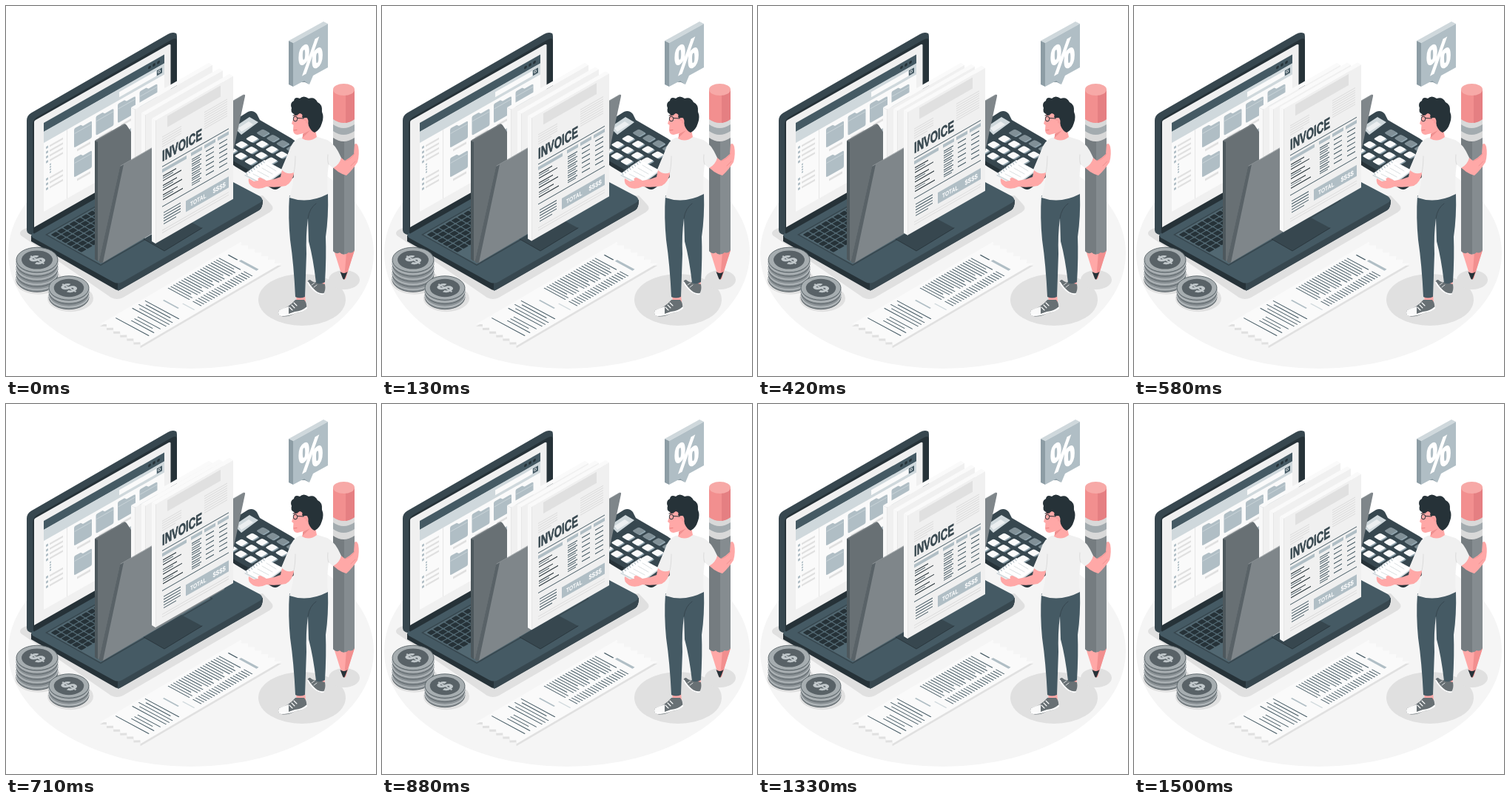
Write an HTML page that moves like this. It is 500 px wide and 500 px high and loops after 1.54 s.

```html
<!DOCTYPE html>
<html lang="en">
<head>
<meta charset="utf-8">
<title>Invoice</title>
<style>
html,body{margin:0;width:100%;height:100%;overflow:hidden;background:#fff}
svg{display:block;width:100vw;height:100vh}
text{font-family:"Liberation Sans",Arial,sans-serif;font-weight:700}
</style>
</head>
<body>
<svg id="stage" viewBox="0 0 500 500"></svg>
<script>
const NIGHT = '#263238', DARK = '#37474f', SLATE = '#455a64', MIST = '#b0bec5';
const SKIN = '#ffa8a7', PALE = '#f0f0f0', SHADE = '#e0e0e0';

const path = (d, fill, extra = '') => `<path d="${d}" fill="${fill}" ${extra}/>`;
const poly = (pts, fill, extra = '') => `<polygon points="${pts}" fill="${fill}" ${extra}/>`;
const rect = (x, y, w, h, fill, extra = '') =>
  `<rect x="${x}" y="${y}" width="${w}" height="${h}" fill="${fill}" ${extra}/>`;
const oval = (x, y, rx, ry, fill, extra = '') =>
  `<ellipse cx="${x}" cy="${y}" rx="${rx}" ry="${ry}" fill="${fill}" ${extra}/>`;
const stroke = (d, color, w = 1) =>
  `<path d="${d}" fill="none" stroke="${color}" stroke-width="${w}" stroke-linecap="round" stroke-linejoin="round"/>`;
const line = (x1, y1, x2, y2, color, w = 1) => stroke(`M${x1} ${y1}L${x2} ${y2}`, color, w);
const plane = (m, inner) => `<g transform="matrix(${m})">${inner}</g>`;
const label = (m, s, size, fill, anchor = 'start', bold = 0) =>
  `<text transform="matrix(${m})" font-size="${size}" fill="${fill}" stroke="${fill}" stroke-width="${bold}" text-anchor="${anchor}">${s}</text>`;
const each = (n, fn) => Array.from({length: n}, (_, i) => fn(i)).join('');

function ground() {
  return oval(250, 334, 247, 156, '#f5f5f5') +
    path('M20 310Q16 304 28 300L347 256L358 268Q364 274 356 279L158 394Q150 398 142 394Z', SHADE) +
    oval(400, 397, 59, 35, SHADE) + oval(457, 370, 21, 13, SHADE);
}

function folderIcon(x, y) {
  return path(`M${x} ${y + 2}q0-2 2-2h7l3 3h10q2 0 2 2v19q0 2-2 2h-20q-2 0-2-2z`, MIST) +
    line(x + 1, y + 7, x + 23, y + 7, '#cfd8dc', .7) +
    rect(x + 4, y + 30, 18, 3, SHADE);
}

function browser() {
  let s = rect(0, 0, 163, 120, '#fafafa') + rect(0, 0, 163, 12, SLATE) + rect(0, 12, 163, 15, '#cfd8dc');
  s += each(3, i => `<circle cx="${143 + i * 6}" cy="6" r="1.9" fill="${NIGHT}"/>`);
  s += rect(102, 16, 50, 7, '#fafafa') + rect(153, 16, 7, 7, SLATE) +
    '<circle cx="156" cy="19" r="1.6" fill="none" stroke="#fff" stroke-width=".7"/>';
  s += rect(31, 27, .8, 93, SHADE);
  s += each(4, i => rect(3, 34 + i * 6.5, 3, 3, MIST) + rect(8, 34.5 + i * 6.5, 18, 2.5, SHADE));
  s += each(4, i => rect(8, 60 + i * 3.5, 2, 2, MIST));
  s += each(3, i => rect(3, 77 + i * 6.5, 3, 3, MIST) + rect(8, 77.5 + i * 6.5, 18, 2.5, SHADE));
  s += each(4, i => folderIcon(41 + i * 29.5, 31)) + each(4, i => folderIcon(41 + i * 29.5, 71));
  return plane('1 -.567 0 1 51 158', s);
}

function laptop() {
  let s = path('M28 155Q28 148 34 144.500L219 38Q225 34.500 230 37Q231 38 231 43V202L40 310Q28 309 28 303Z', DARK);
  s += path('M36 160Q36 154 42 150L223 46Q231 41 231 48V202L37 310Z', NIGHT);
  s += path('M38 157Q38 155 40 154L220 52Q222.500 51 222.500 53V194L38 299Z', PALE) + browser();
  s += path('M34 310V318L146 382Q151 386 157 382L342 276Q347 273 347 262Z', NIGHT);
  s += path('M151 373V385Q154 384 157 382L342 276Q347 273 347 262Z', DARK);
  s += path('M38 306Q32 309 36 313L145 373Q151 376 157 373L343 266Q350 262 343 257L231 198Z', SLATE);
  s += line(38, 306.5, 222, 202, NIGHT, 2);
  s += poly('53,309 128,351 280,263 205,222', DARK) + poly('56,309 128,349 277,263 205,224', '#526872');
  const keys = each(6, r => each(15, c => rect(2 + c * 9.5, 2 + r * 8.2, 8, 6.8, NIGHT, 'rx="1.2"')));
  s += plane('.866 -.5 .866 .5 57 309', keys);
  s += poly('186,315 214,331 265,300 237,285', DARK) + stroke('M186 315L214 331L265 300', NIGHT, .8);
  return s;
}

function calculator() {
  let s = path('M300 170V205Q302 212 310 217L358 246Q364 250 369 246L391 230Q394 226 391 190Z', NIGHT);
  s += path('M300 160L327 143Q334 140 339 146L343 154L386 179Q395 184 391 192L369 238Q364 242 357 238L308 210L298 202Z', DARK);
  s += poly('308,164 329,150 341,157 318,174', '#cfd8dc') + poly('314,165 328,156 334,160 318,170', '#eceff1');
  const key = (x, y, c) => plane(`.866 -.5 .866 .5 ${x} ${y}`,
    rect(-5.2, -3.2, 10.4, 10, '#90a4ae', 'rx="2"') + rect(-5.2, -5.2, 10.4, 10, c, 'rx="2"'));
  s += each(4, r => each(4, c => key(347 + c * 13.3 - r * 14.3, 171.5 + c * 7.2 + r * 8, r ? '#fafafa' : '#819097')));
  return s;
}

function sheet(x, y, extra = '') {
  return poly(`${x},${y} ${x + 105},${y - 60.2} ${x + 110},${y - 57.2} ${x + 5},${y + 3}`, '#fafafa') +
    poly(`${x},${y} ${x + 5},${y + 3} ${x + 5},${y + 169} ${x},${y + 166}`, '#f8f8f8') +
    plane(`1 -.573 0 1 ${x + 5} ${y + 3}`, rect(0, 0, 105, 166, PALE) + rect(0, 0, .6, 166, SHADE) + extra);
}

function invoice() {
  let s = rect(16, 3, 72, 15, SHADE);
  s += each(5, i => rect(9, 27 + i * 3.2, i == 4 ? 18 : 26, 1, '#dadada'));
  s += each(8, i => rect(66, 26 + i * 3.2, 31, 1, '#dadada'));
  s += label('.64 0 0 1 9 60.500', 'INVOICE', 20.5, DARK, 'start', .7);
  s += rect(9, 67, 90, 1, SLATE);
  const cols = [[9, 33], [48, 15], [66, 15], [84, 15]];
  s += cols.map(([x, w]) => rect(x, 71, w, 4.5, MIST)).join('');
  s += each(6, r => {
    const y = 80 + r * 6.4;
    return rect(10, y, 18 + r * 7 % 13, 1.2, NIGHT) + (r % 2 ? '' : rect(10, y + 3, 14, .9, SLATE)) +
      rect(49, y, 13, 1.2, SLATE) + rect(49, y + 2.8, 11, 1, SLATE) +
      rect(68, y, 11, 1.2, SLATE) + rect(86, y, 11, 1.2, SLATE);
  });
  s += rect(9, 121, 90, 1, SLATE);
  s += each(5, i => rect(11, 130 + i * 3.8, i == 4 ? 17 : 23, 1.1, SLATE));
  s += rect(41, 132, 58, 15, MIST);
  s += label('.78 0 0 1 47 143', 'TOTAL', 8.5, '#fff') + label('.82 0 0 1 77.500 143', '$$$$', 9.5, '#fff');
  s += rect(9, 153, 90, .8, '#d6d6d6') + rect(9, 156.5, 90, .8, '#d6d6d6');
  return sheet(197, 152, s);
}

function folderBack() {
  return path('M120 183Q120 181 123 180L158 160Q161 158 163 161L169 170L275 112L250 265L131 347L120 342Z', '#687074') +
    path('M120 182L124 184V345L120 342Z', '#4d585d') + stroke('M121 182L160 160', '#858c90', .8);
}

function folderFront() {
  return path('M154 217L319 121Q324 118 323 122L296 248Q295 251 292 252L132 346Q126 349 126 343Z', '#7f868a') +
    path('M154 217L159 214L131 346.500Q125 349 126 343Z', '#596267') +
    stroke('M155 216L321 120', '#939a9d', .8);
}

function receipt() {
  const teeth = 6, w = 62 / teeth;
  const zig = dir => `l${-5 * dir} ${w / 2 * dir}l${5 * dir} ${w / 2 * dir}`;
  const d = 'M0 0H221' + zig(1).repeat(teeth) + 'H0' + zig(-1).repeat(teeth) + 'Z';
  let s = '';
  const row = (x, a, b, c = SLATE, h = 1.1) => rect(x, a, h, b - a, c);
  s += row(20, 4, 55) + row(28, 20, 55) + row(33, 20, 48) + row(38, 20, 55);
  s += each(5, i => row(46 + i * 5, i % 2 ? 10 : 4, i == 3 ? 48 : 56));
  s += row(80, 18, 41, MIST, 2) + row(90, 38, 56, '#cfd8dc', 1.5);
  s += each(20, i => row(101 + i * 4.2, 5, i % 4 == 2 ? 32 : 38) + row(101 + i * 4.2, 43, 56));
  s += row(192, 8, 22, SLATE, 1.5) + row(192, 25, 52, MIST, 3.5);
  const m = '.863 -.505 .881 .473 127 ';
  return plane(m + 433, path(d, SHADE)) + plane(m + 430, path(d, '#fafafa') + s);
}

function coins(x, y, n, r) {
  const ry = r * .6, step = 7;
  const arc = (cy, color, w) => stroke(`M${x - r} ${cy}a${r} ${ry} 0 0 0 ${2 * r} 0`, color, w);
  const drum = i => {
    const cy = y + i * step;
    return path(`M${x - r} ${cy}v5.500a${r} ${ry} 0 0 0 ${2 * r} 0v-5.500z`, '#8b9296') +
      arc(cy + 5.5, '#596267', 1) + arc(cy + 2.5, '#b4babd', 1.6);
  };
  let s = oval(x + 2, y + n * step, r + 4, ry + 2, SHADE);
  for (let i = n - 1; i >= 0; i--) s += drum(i);
  return s + oval(x, y, r, ry, '#a6adb0', 'stroke="#596267" stroke-width=".9"') +
    oval(x, y, r * .75, ry * .75, '#596267') +
    label(`.866 -.5 .866 .5 ${x + 7.5} ${y + 4.3}`, '$', 25, '#c3cacd', 'middle', .7);
}

function bubble() {
  return poly('382,47 429,21 435,24 388,50', '#cfd8dc') +
    poly('382,47 388,50 388,109 382,106', '#8d9da5') +
    poly('398,103 404,100 410,106 404,103', '#8d9da5') +
    poly('388,50 435,24 435,83 415,94 410,106 403,101 388,109', MIST) +
    label('.67 -.38 0 1 411.500 87', '%', 55, '#fff', 'middle', 2.4);
}

function pencil() {
  return path('M443 330L455 368Q457 371 459 368L471 330Z', SKIN) +
    path('M460 333L471 330L459 368L457 370Z', '#f28f8f') +
    path('M451.500 359Q457 363 461.500 359L458 368Q456.500 371 455 368Z', NIGHT) +
    path('M442 178V331Q446 336 451 333Q457 338 463 333Q468 335 471 330V178Z', '#858c90') +
    path('M442 178V331Q446 336 451 333Q454 336 457 335.500V183Z', '#757c80') +
    path('M442 152V178Q456 188 471 178V152Z', '#d9d9d9') +
    path('M442 160V169Q456 179 471 169V160Q456 170 442 160Z', '#a3abaf') +
    path('M442 113V153Q456 163 471 153V113Z', '#f28f8f') +
    path('M459 113H471V153Q466 157 459 158Z', '#e57f82') +
    oval(456.500, 113, 14.5, 8, '#f7a9a7');
}

function shoes() {
  const back = path('M419 373L431 376Q432.500 384 429 389Q424 391 419 387Q412 381 408 374Q407 370 411 370Q416 374 419 373Z', '#687074') +
    stroke('M408 373.500Q413 382 420 387Q425 390 429 389', '#fff', 1.8) +
    stroke('M413 377L417 374M416 380L420 377', '#fff', .8);
  const front = path('M23 0L35 0Q39 5 38 11Q34 17 23 18Q12 24 4 22Q-2 20 1 14Q14 11 23 0Z', '#687074') +
    path('M14 9Q6 12 1 14Q-2 20 4 22Q9 22 14 20Z', '#fafafa') +
    stroke('M2 20Q12 22 23 17Q33 16 38 11', '#fff', 2.2) +
    stroke('M15 10L19 14M18 7L22 11M21 4L25 8', '#fff', 1.1);
  return back + `<g transform="translate(368 397)">${front}</g>`;
}

function notepad() {
  return poly('322,229 349,210 375,224 349,243', '#cfd8dc') +
    poly('322,227 349,208 375,222 349,241', '#fff') +
    each(8, i => line(324 + i * 3.3, 225 - i * 2.3, 326 + i * 3.3, 228 - i * 2.3, '#90a4ae', .9)) +
    each(4, i => line(334 + i * 6, 227 - i * 4, 350 + i * 5, 235 - i * 4, '#d0d6d9', .8));
}

function man() {
  let s = path('M392 390H404L405 401L393 403Z', SKIN) + path('M420 368H430L431 378L420 376Z', SKIN);
  s += shoes();
  s += path('M383 256Q408 267 435 253Q436 285 432 312Q433 340 431 373Q425 377 419 374Q415 340 409 318L408 287Q405 310 406 335L404 393Q397 396 391 393Q389 350 384 316Q381 285 383 256Z', SLATE);
  s += stroke('M408 287Q410 273 419 267', DARK, 1);
  s += notepad();
  s += path('M374 217L390 223Q387 239 378 243Q364 246 352 244Q342 249 334 245Q326 240 328 233L335 237L341 236Q339 232 344 232L352 236Q362 235 371 231Z', SKIN);
  s += path('M437 213L449 202L458 209Q464 206 470 200L471 187Q474 184 476 190Q478 200 475 211Q468 222 460 229Q448 226 437 213Z', SKIN);
  s += stroke('M471 199Q468 206 459 209M466 216L472 210', '#ef8f8f', .8);
  s += path('M397 178Q387 181 382 197L372 221Q380 229 389 225Q389 240 383 259Q408 268 435 254Q433 235 436 214L442 219Q451 214 453 205Q445 186 434 181L418 176Z', PALE);
  s += stroke('M391 203Q391 216 389 225M435 201Q434 210 436 214', '#d9d9d9', .9);
  s += path('M390 141L388 153L386 159L388.500 161L388 167Q388 174 394 174L402 172L400 179Q410 185 420 177L416 158L402 141Z', SKIN);
  s += path('M401 173L411 168L401 178Z', '#ef8f8f');
  s += path('M389 146Q384 143 386 138Q383 131 389 128Q390 122 397 125Q402 120 409 125Q417 122 421 130Q428 133 427 143Q430 150 427 158Q424 168 417 171Q412 169 409 162L407 151Q403 154 400 150Q402 146 397 145Q392 149 389 146Z', NIGHT);
  s += oval(404.500, 156, 4, 5, SKIN) + stroke('M403 154Q407 153 406 158', '#ef8f8f', .8);
  s += oval(391, 152.5, 2.7, 3.4, 'none', `stroke="${NIGHT}" stroke-width="1"`);
  s += line(394, 151.5, 402, 152, NIGHT, 1) + line(388, 148, 394, 147, NIGHT, 1);
  return s + stroke('M389 168L393 167.500', '#e57373', .8);
}

const stage = document.getElementById('stage');
stage.innerHTML = ground() + calculator() + laptop() + folderBack() + sheet(169, 137) +
  `<g id="middle">${sheet(183, 144.5)}</g>` + folderFront() + `<g id="front">${invoice()}</g>` +
  receipt() + coins(42, 343, 4, 28) + coins(85, 381, 2, 27) + bubble() + pencil() + man();
const middle = document.getElementById('middle');
const front = document.getElementById('front');

const LOOP = 1540, PEAK = 735, LAND = 1480, LIFT = 19.6;

function draw(ms) {
  const t = ms % LOOP;
  const k = t < PEAK ? t / PEAK : Math.max(0, (LAND - t) / (LAND - PEAK));
  front.setAttribute('transform', `translate(0 ${-LIFT * k})`);
  middle.setAttribute('transform', `translate(0 ${-LIFT * k / 2})`);
}

let start;
function tick(now) {
  start ??= now;
  draw(now - start);
  requestAnimationFrame(tick);
}
draw(0);
requestAnimationFrame(tick);
</script>
</body>
</html>
```
